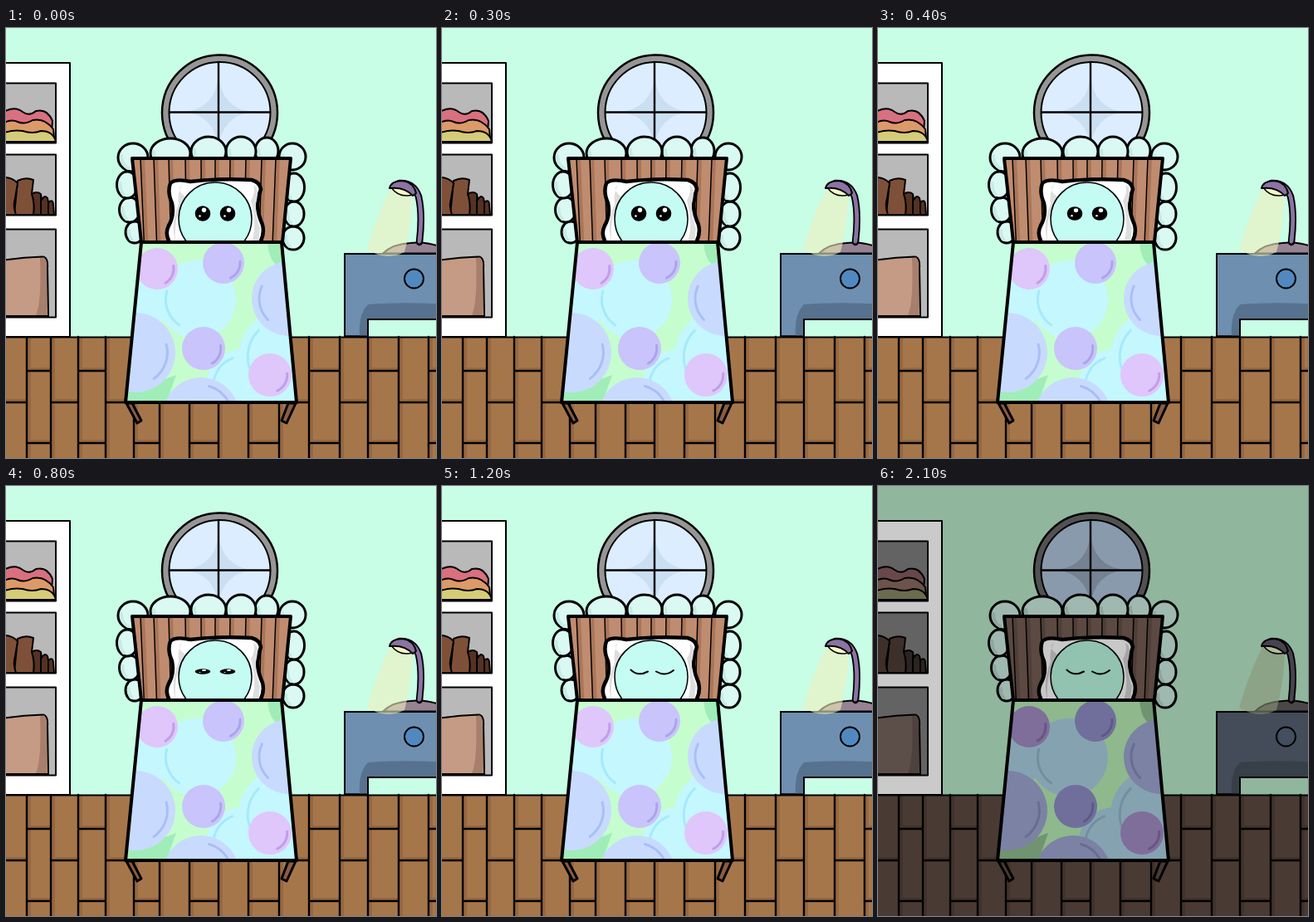
Write an HTML page that moves like this. It is 518 px wide and 518 px high and loops after 3 s.

```html
<!DOCTYPE html>
<html lang="en">
<head>
<meta charset="utf-8">
<title>Bedtime</title>
<style>
html, body { margin: 0; width: 100%; height: 100%; overflow: hidden; }
svg {
  display: block; width: 100vw; height: 100vh;
  --wall: #c8fde6; --plank: #a6764b; --plankDark: #966842; --shelf: #fff; --back: #b9b9b9;
  --pink: #d9707f; --orange: #dc9a68; --yellow: #d5cc78; --boots: #7f5038; --bootsDark: #553222;
  --box: #c59b85; --boxDark: #a87f6c;
  --ring: #969696; --glass: #dcedff; --glint: #cbdff3;
  --frill: #daf9f3; --frillDark: #c6ece6;
  --board: #c08c70; --boardDark: #a97659; --pillow: #fff; --pillowDark: #dedede;
  --face: #c4fcf3; --faceDark: #a9ebe2;
  --quilt: #c5fdcf; --quiltDark: #a0edb7; --sky: #c5f7ff; --skyDark: #a5eafa;
  --lilac: #c9c4fb; --lilacDark: #aaa5ea; --rose: #dfc6fb; --roseDark: #bf9fe8;
  --peri: #c8dbff; --periDark: #a9bff5; --leg: #8a5c43;
  --desk: #6f8fb0; --deskDark: #56728f; --knob: #5288c0;
  --lamp: #8b74a3; --base: #968392; --bulb: #f6f7c8; --light: #f0f1bf;
}
svg.night {
  --wall: #90b69d; --plank: #493b34; --plankDark: #41332b; --shelf: #cacaca; --back: #636363;
  --pink: #69474b; --orange: #6c544a; --yellow: #6b6b4e; --boots: #3d302a; --bootsDark: #2c2421;
  --box: #5c4f49; --boxDark: #4d423d;
  --ring: #525252; --glass: #8a9aad; --glint: #748291;
  --frill: #9fb9b0; --frillDark: #8ca69e;
  --board: #5b4942; --boardDark: #4f3f38; --pillow: #c8c8c8; --pillowDark: #a6a6a6;
  --face: #92c2b0; --faceDark: #82b09f;
  --quilt: #8fb88c; --quiltDark: #6f946f; --sky: #85a2b1; --skyDark: #718f9f;
  --lilac: #706f9b; --lilacDark: #5c5a85; --rose: #7f6d9a; --roseDark: #685583;
  --peri: #7b82a3; --periDark: #676e90; --leg: #473a34;
  --desk: #434c58; --deskDark: #373f49; --knob: #434f5e;
  --lamp: #48434f; --base: #4b4749; --bulb: #b3bd9a; --light: #8b9678;
}
.ink { stroke: #000; stroke-linejoin: round; stroke-linecap: round; }
.line { fill: none; }
</style>
</head>
<body>
<svg id="room" viewBox="0 0 518 518" preserveAspectRatio="none">
  <defs>
    <clipPath id="quiltClip"><path d="M163 258H332L350 451H144Z"/></clipPath>
    <clipPath id="bedTop"><path d="M140 140H360V257H140Z"/></clipPath>
    <clipPath id="faceClip"><circle cx="252" cy="230" r="44"/></clipPath>
    <clipPath id="boardClip"><path d="M152 157H343L333 258H163Z"/></clipPath>
  </defs>
  <rect width="518" height="518" fill="var(--wall)"/>
  <g id="floor"></g>

  <g class="ink" stroke-width="2">
    <rect x="-5" y="42" width="82" height="330" fill="var(--shelf)"/>
    <g fill="var(--back)">
      <rect x="-5" y="66.500" width="65" height="72"/>
      <rect x="-5" y="152.500" width="65" height="73"/>
      <rect x="-5" y="242.500" width="65" height="106"/>
    </g>
    <path fill="var(--pink)" d="M-4 102Q10 93 20 101Q28 107 36 100Q50 97 56 112L55 124H-4Z"/>
    <path fill="var(--orange)" d="M-4 115Q6 109 14 113Q22 117 32 111Q47 108 57 122L58 132H-4Z"/>
    <path fill="var(--yellow)" d="M-4 127Q8 122 20 124Q32 128 42 124Q57 124 60 137H-4Z"/>
    <path fill="var(--bootsDark)" d="M31 200Q37 196 42 200L43 207Q47 200 50 205L51 210Q57 205 57 214L58 225H29Z"/>
    <path class="line" d="M42 202V224M51 210V224"/>
    <path fill="var(--boots)" d="M14 184Q24 179 33 183L31 200Q35 212 33 225H10Z"/>
    <path fill="var(--boots)" d="M-4 180Q7 179 14 187L11 205Q8 215 12 225H-4Z"/>
    <path fill="var(--box)" d="M-4 280Q20 276 44 275.500Q51 276 50 289L51 347H-4Z"/>
    <path fill="var(--boxDark)" stroke="none" d="M41 277L46 276.500Q49 280 49 291V346H36Q43 330 41 277Z"/>
  </g>

  <g class="ink">
    <circle cx="257.500" cy="102" r="69.500" fill="var(--ring)" stroke-width="2.500"/>
    <circle cx="257.500" cy="102" r="61" fill="var(--glass)" stroke-width="2"/>
    <path fill="var(--glint)" stroke="none" d="M256 58Q260 97 297 101Q260 106 256 144Q252 106 215 101Q252 97 256 58Z"/>
    <path fill="var(--glint)" stroke="none" d="M256 66Q264 94 290 101Q264 108 256 138Q248 108 222 101Q248 94 256 66Z"/>
    <path class="line" d="M256 41V150M197 101.500H318" stroke-width="2.400"/>
  </g>

  <g id="frill" class="ink" stroke-width="3"></g>

  <g clip-path="url(#boardClip)">
    <rect x="140" y="150" width="215" height="112" fill="var(--board)"/>
    <g id="slats"></g>
  </g>
  <path class="ink line" d="M152 157H343L333 258H163Z" stroke-width="4"/>

  <g clip-path="url(#bedTop)">
    <path class="ink" fill="var(--pillow)" stroke-width="4.500" d="M197 258Q191 248 196 238Q203 226 200 211Q194 198 198 187Q204 181 222 185Q254 181 296 183Q306 186 307 194Q303 206 303 215Q304 226 309 237Q312 249 305 260Z"/>
    <path fill="var(--pillowDark)" d="M204 258Q202 225 216 203Q204 194 212 189Q206 199 208 212Q198 235 204 258ZM296 258Q303 237 295 208Q301 198 298 189Q306 193 301 212Q300 226 306 241L304 258Z"/>
    <circle cx="252" cy="230" r="44" fill="var(--face)"/>
    <path clip-path="url(#faceClip)" fill="var(--faceDark)" opacity=".6" d="M208 210Q207 240 222 262H200V205Z"/>
    <circle class="ink line" cx="252" cy="230" r="44" stroke-width="1.500"/>
  </g>
  <g id="eyes"></g>
  <path id="lids" class="ink line" stroke-width="2" d="M227.500 221.500Q236 230 248 223.500M258 223.500Q269 230 279 222"/>

  <g class="ink" fill="var(--leg)" stroke-width="3">
    <path d="M145 452L158 476L163 473L152 452Z"/>
    <path d="M349 452L338 476L332 473L340 452Z"/>
  </g>
  <g clip-path="url(#quiltClip)">
    <path fill="var(--quilt)" d="M140 250H360V455H140Z"/>
    <path fill="var(--quiltDark)" d="M140 436Q175 430 205 418L192 455H140ZM315 255H340V290Q316 290 315 255Z"/>
    <g id="spots"></g>
  </g>
  <path class="ink line" d="M163 258H332L350 451H144Z" stroke-width="4"/>

  <g class="ink" stroke-width="2">
    <path fill="var(--desk)" d="M408 272H525V351H436V371.500H408Z"/>
    <path fill="var(--deskDark)" stroke="none" d="M426 371Q424 345 436 333Q470 330 518 332V350H436V371Z"/>
    <path class="line" d="M408 272H525M525 351H436V371.500H408V272"/>
    <circle cx="491.500" cy="302" r="11.500" fill="var(--knob)"/>
    <path fill="var(--base)" d="M454 271.500Q466 260 487 259Q506 257 525 264V271.500Z"/>
    <path class="line" d="M498 258Q502 225 497 203Q491 186 474 187" stroke-width="8.500"/>
    <path class="line" d="M498 257Q502 225 497 203Q491 186 474 187" style="stroke:var(--lamp)" stroke-width="4.800"/>
    <path fill="var(--light)" stroke="none" opacity=".6" d="M463 194L490 203Q488 240 480 270Q458 281 435 267Q447 226 463 194Z"/>
    <path fill="var(--bulb)" stroke-width="1.500" d="M464 192Q477 190 490 201Q473 205 464 192Z"/>
    <path fill="var(--lamp)" d="M462 193Q464 184 478 184Q491 186 494 199L490 202Q480 191 462 193Z"/>
  </g>
</svg>
<script>
const $ = id => document.getElementById(id);
const room = $('room');

// Floor: planks alternate between two seam patterns
const joints = [-6, 25, 54, 87, 120, 154, 185, 221, 256, 292, 329, 365, 402, 436, 473, 509, 540];
$('floor').innerHTML = '<path fill="var(--plank)" d="M0 372H518V518H0Z"/>' +
  joints.slice(0, -1).map((x, i) => {
    const w = joints[i + 1] - x;
    const seams = i % 2 ? [413, 500] : [451];
    return `<path fill="var(--plankDark)" d="M${x} 372h5V518h-5Z"/>` +
      seams.map(y => `<path fill="var(--plankDark)" d="M${x} ${y - 4}h${w}v4h${-w}Z"/>`).join('') +
      `<path class="ink line" stroke-width="2.400" d="M${x} 372V518${seams.map(y => `M${x} ${y}h${w}`).join('')}"/>`;
  }).join('') + '<path class="ink line" stroke-width="2" d="M0 372.500H518"/>';

// Scalloped trim around the headboard: x, y, rx, ry
$('frill').innerHTML = [
  [155, 246, 11, 13], [149, 219, 12.5, 15], [146, 189, 12.5, 16],
  [346, 253, 13, 14], [347, 224, 12, 15], [347, 192, 12.5, 17],
  [153, 156, 18, 17], [345, 155, 16, 16], [198, 151, 24, 18],
  [314, 148, 14, 16], [283, 149, 18, 18], [244, 149, 21, 18]
].map(([x, y, a, b]) =>
  `<ellipse cx="${x}" cy="${y}" rx="${a}" ry="${b}" fill="var(--frill)"/>` +
  `<path class="line" stroke-width="4" style="stroke:var(--frillDark)" d="M${x - a + 4} ${y - 2}Q${x - a + 4} ${y + b / 2} ${x - a / 3} ${y + b - 4}"/>`
).join('');

// Headboard slats lean slightly inwards
$('slats').innerHTML = [162, 178, 196, 216, 235, 252, 270, 289, 308, 325].map(x => {
  const foot = 248 + (x - 248) * 0.95;
  return `<path fill="var(--boardDark)" d="M${x} 157h5L${foot + 5} 258h-5Z"/>` +
    `<path class="ink line" stroke-width="1.500" d="M${x} 157L${foot} 258"/>`;
}).join('');

// Quilt spots: colour, x, y, r, direction of the crease in degrees
function spot([color, x, y, r, dir]) {
  const k = r * 0.8;
  const at = deg => {
    const a = deg * Math.PI / 180;
    return `${x + k * Math.cos(a)} ${y + k * Math.sin(a)}`;
  };
  return `<circle cx="${x}" cy="${y}" r="${r}" fill="var(--${color})"/>` +
    `<path class="line" stroke-width="3" stroke-linecap="round" style="stroke:var(--${color}Dark)" ` +
    `d="M${at(dir - 35)}A${k} ${k} 0 0 1 ${at(dir + 35)}"/>`;
}
$('spots').innerHTML = [
  ['sky', 176, 329, 27, 0], ['sky', 230, 327, 47, 160], ['sky', 285, 431, 44, 215],
  ['sky', 336, 396, 56, 190], ['peri', 341, 326, 45, 170], ['peri', 156, 391, 48, 20],
  ['peri', 235, 467, 46, -40], ['rose', 182, 290, 25, 25], ['lilac', 262, 283, 25, 30],
  ['lilac', 238, 386, 26, 25], ['rose', 318, 418, 26, 30]
].map(spot).join('');

$('eyes').innerHTML = [237, 267].map(x => `<g data-x="${x}">
  <circle r="9.300"/><circle cx="1.500" cy="-4.300" r="2.700" fill="#fff"/><circle cx="-3.500" cy="3" r="1.300" fill="#fff"/></g>`).join('');
const eyes = [...$('eyes').children];

// Eye openness by start time
const blink = [[0, 1], [400, 0.9], [500, 0.73], [600, 0.52], [800, 0.34], [1200, 0]];

function draw(now) {
  const t = now % 3000;
  const open = blink.filter(([at]) => at <= t).pop()[1];
  for (const eye of eyes) {
    eye.setAttribute('transform', `translate(${eye.dataset.x} 223.500) scale(1 ${open || 1})`);
  }
  $('eyes').style.display = open ? '' : 'none';
  $('lids').style.display = open ? 'none' : '';
  room.classList.toggle('night', t >= 2000);
}

const start = performance.now();
(function tick() {
  draw(performance.now() - start);
  requestAnimationFrame(tick);
})();
</script>
</body>
</html>
```
